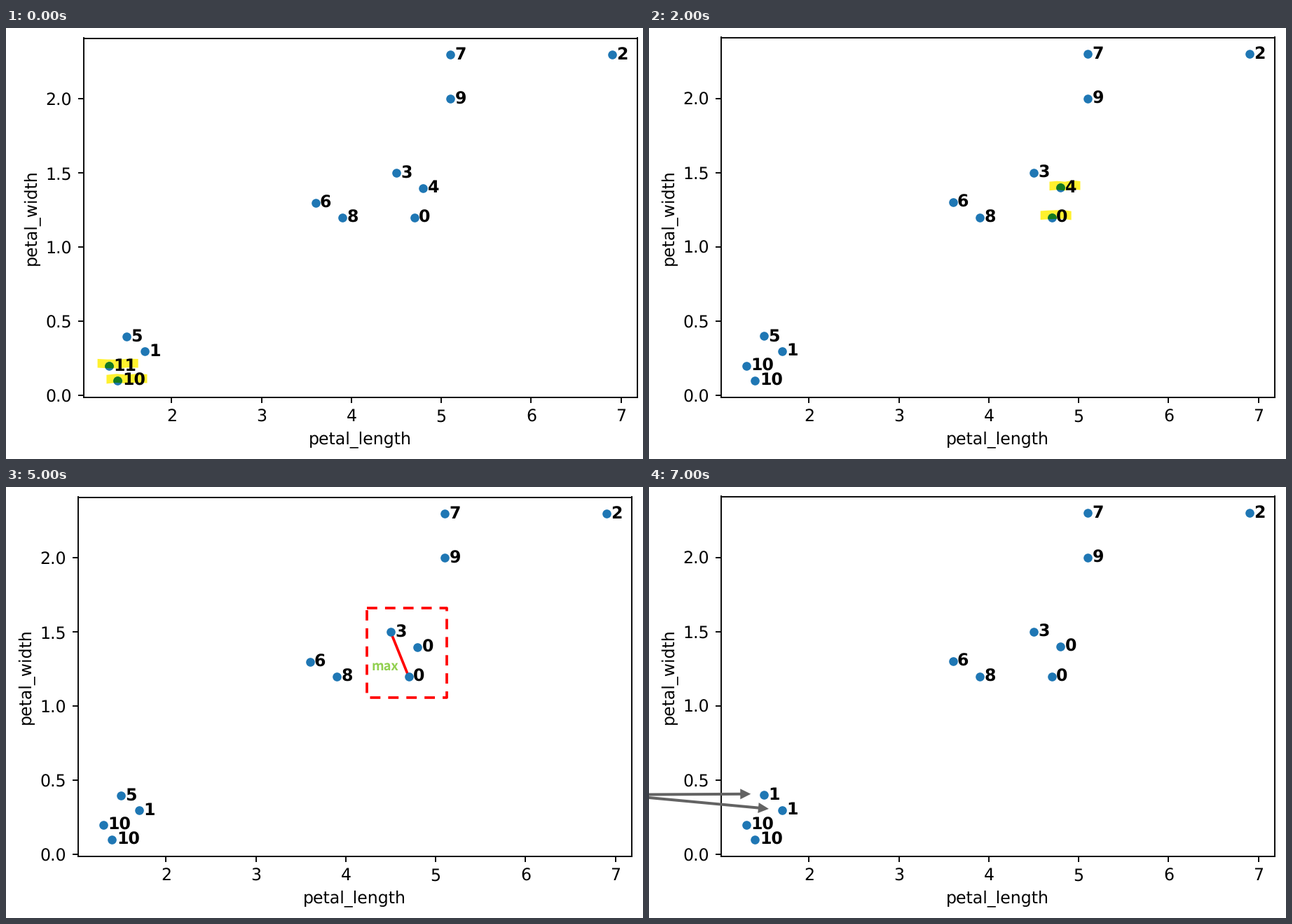
A matplotlib script for the animation above (8000 ms loop, 909x616 px).

```python
import numpy as np
import matplotlib.pyplot as plt
from matplotlib.animation import FuncAnimation
from matplotlib.patches import Polygon
from matplotlib.transforms import Affine2D

W, H, DPI = 909, 616, 64
PT = 72 / DPI          # points per pixel
K = 169.8 / DPI        # enlarges the default 6 x 4 inch chart style

plt.rcParams.update({
    "font.family": "DejaVu Sans", "font.size": 10 * K, "text.hinting": "none",
    "axes.linewidth": 0.8 * K, "axes.labelpad": 3.7 * K,
    **{f"{a}tick.major.{k}": v * K for a in "xy"
       for k, v in (("size", 3.5), ("pad", 3.5), ("width", 0.8))},
})

BLUE, GREEN, YELLOW, PALE = "#1f77b4", "#147a1e", "#fff12e", "#fff67a"
GREY, RED, LIME = "#636363", "#ff0000", "#92d050"
POINTS = np.array([(4.7, 1.2), (1.7, 0.3), (6.9, 2.3), (4.5, 1.5), (4.8, 1.4),
                   (1.5, 0.4), (3.6, 1.3), (5.1, 2.3), (3.9, 1.2), (5.1, 2.0),
                   (1.4, 0.1), (1.3, 0.2)])
MERGES = [(11, 10), (4, 0), (5, 1)]

fig = plt.figure(figsize=(W / DPI, H / DPI), dpi=DPI, facecolor="white")
ax = fig.add_axes([0, 0, 1, 1])
PX = Affine2D().scale(1 / W, -1 / H).translate(0, 1) + fig.transFigure


def spot(i):
    """Stage position of data point i in pixels."""
    return PX.inverted().transform(ax.transData.transform(POINTS[i]))


def line(pts, color, width, z=5, **kw):
    ax.plot(*np.transpose(pts), color=color, lw=width * PT, transform=PX,
            clip_on=False, zorder=z, **kw)


def shape(pts, color, z):
    return ax.add_patch(Polygon(pts, fc=color, ec="none", transform=PX,
                                clip_on=False, zorder=z))


def note(x, y, text, size, **kw):
    ax.text(x, y, text, transform=PX, family="Noto Sans CJK JP",
            size=size * PT, zorder=6, **kw)


def dots(ids, color, z):
    return ax.scatter(*POINTS[ids].T, s=(12.6 * PT) ** 2, c=color,
                      linewidths=0, zorder=z)


def arrow(start, tip, head=15, half=7.5):
    u = (tip - start) / np.hypot(*(tip - start))
    side = np.array([-u[1], u[0]]) * half
    base = tip - head * u
    line([start, base + 2 * u], GREY, 4)
    shape([tip, base + side, base - side], GREY, 6)


def mark(pts, ids, color=YELLOW):
    """Highlighter ink; dots turn green where it covers them."""
    ink = shape(pts, color, 1)
    dots(ids, GREEN, 3).set_clip_path(ink)


def pen(i):
    """One slightly shaky highlighter stroke across a dot and its label."""
    x, y = spot(i)
    xs = np.linspace(x - 16, x + 14 + 14 * len(str(i)), 5)
    mid = y - 3 + np.random.default_rng(i).uniform(-1, 1, 5)
    mark([*zip(xs, mid - 6.3), *zip(xs[::-1], mid[::-1] + 6.3)], [i])


def oval(scale=1.0, n=60):
    """Leaning ellipse around the merged pair."""
    t = np.linspace(0, 2 * np.pi, n)
    ring = np.column_stack([19 * np.cos(t), 42 * np.sin(t)]) * scale
    return Affine2D().rotate_deg(13).translate(592, 246).transform(ring)


def pens(step):
    for i in MERGES[step]:
        pen(i)


def arrows(step, hub, offset, gap=0.0):
    """Two arrows from a shared hub towards a freshly merged pair."""
    hub = np.array(hub, float)
    for i in MERGES[step]:
        tip = spot(i) + offset
        arrow(hub + gap * (tip - hub), tip)


def dashed_box():
    x0, x1 = 515, 629
    y0 = spot(3)[1] - 34.5
    y1 = y0 + 128.5
    line([(x0, y0), (x1, y0), (x1, y1), (x0, y1), (x0, y0)], RED, 3.7,
         ls=(0, (4, 3)), dash_capstyle="butt")


def merge_left(step, hub, offset):
    arrows(step, hub, offset)


def merge_mid():
    arrows(1, (676, 344), (13.4, 16), gap=0.36)
    note(661, 340, "Merged", 35.2)


def cluster():
    dashed_box()
    pen(3)
    mark(oval(), [4, 0], "#fff000")
    for s in (0.3, 0.55, 0.8):
        line(oval(s)[:18], PALE, 1, z=1.5)


def longest():
    dashed_box()
    line([spot(3), spot(0)], RED, 3.7, z=1.5)
    note(522, 262, "max", 18.3, weight="bold", color=LIME)


# merges done, left and top of the chart, page edge visible, what is drawn
SCENES = [
    (0, 110.7, 14.5, False, lambda: pens(0)),
    (1, 102.7, 13.5, True, lambda: arrows(0, (-65, 483.7), (-26, -1))),
    (1, 102.7, 13.5, False, lambda: pens(1)),
    (2, 102.7, 12.5, True, merge_mid),
    (2, 102.7, 13.5, True, cluster),
    (2, 102.7, 14.5, False, longest),
    (2, 102.7, 14.5, False, lambda: pens(2)),
    (3, 102.7, 13.5, False, lambda: arrows(2, (-45, 439.8), (-19, -1.7))),
]


def draw(k):
    merged, left, top, edge, extra = SCENES[k]
    bottom = 526.5 if edge else 527.5
    ax.clear()
    ax.set_position([left / W, 1 - bottom / H, 790 / W, (bottom - top) / H])
    ax.set(xlim=(1.02, 7.18), ylim=(-0.01, 2.41),
           xticks=range(2, 8), yticks=np.arange(0, 2.1, 0.5),
           xlabel="petal_length", ylabel="petal_width")
    names = dict(MERGES[:merged])
    dots(np.arange(len(POINTS)), BLUE, 2)
    for i, (x, y) in enumerate(POINTS):
        ax.text(x + 0.05, y - 0.032, names.get(i, i), weight="bold", zorder=4)
    if edge:
        line([(0, 614.5), (W, 614.5)], "#b4b4b4", 1.3)
    extra()
    return []


anim = FuncAnimation(fig, draw, frames=len(SCENES), init_func=lambda: [],
                     interval=1000, repeat=True, repeat_delay=0, blit=False)
plt.show()
```
